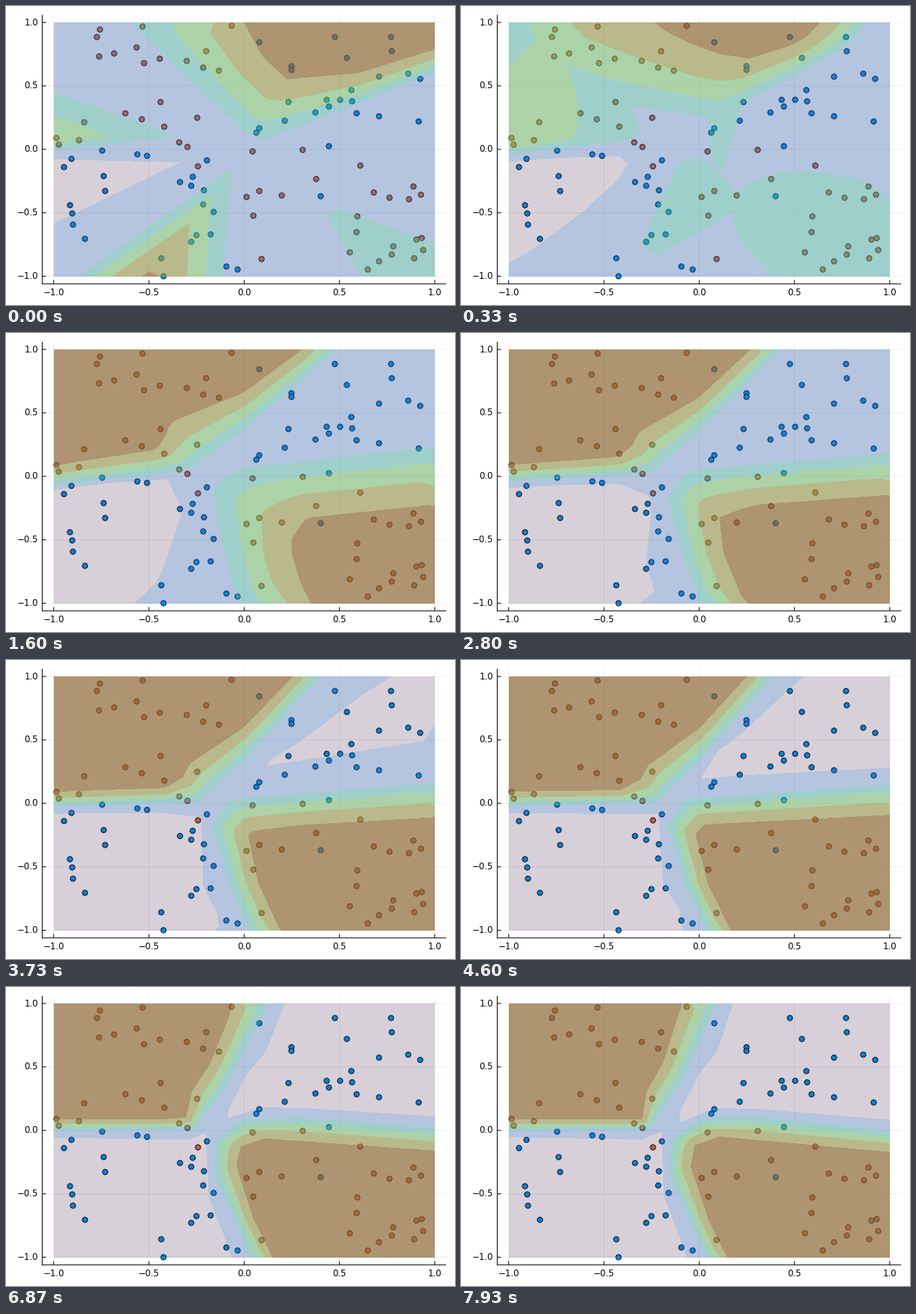
These frames come from a looping animation (600x400 px, 8 s). A matplotlib script:

```python
import numpy as np
import matplotlib.pyplot as plt
from matplotlib.animation import FuncAnimation
from matplotlib.path import Path

W, H, DPI = 600, 400, 100
FRAMES, LOOP = 120, 8000
PX = 72 / DPI
LEFT, RIGHT, TOP, BOTTOM = 64, 573, 22, 362
KEYS = [0, 13, 69, 118]

# Far corners that close the regions outside the plot
UL, UR = (-400, -400), (1000, -400)
LL, LR = (-400, 800), (1000, 800)

gx, gy = np.meshgrid(np.arange(LEFT, RIGHT) + 0.5, np.arange(TOP, BOTTOM) + 0.5)
gx, gy = gx.astype("float32"), gy.astype("float32")

# Per key pose: signed distance to the region above each of the five levels
fields = np.full((len(KEYS), 5) + gx.shape, -np.inf, "float32")
fields[:, 0] = np.inf


def distance(*pts):
    """Signed distance to a polygon, positive inside."""
    p = np.array(pts, "float32")
    best = np.full(gx.shape, np.inf, "float32")
    for (ax_, ay), (dx, dy) in zip(p, np.roll(p, -1, axis=0) - p):
        ux, uy = gx - ax_, gy - ay
        t = np.clip((ux * dx + uy * dy) / (dx * dx + dy * dy), 0, 1)
        best = np.minimum(best, (ux - t * dx) ** 2 + (uy - t * dy) ** 2)
    inside = Path(p).contains_points(np.column_stack([gx.ravel(), gy.ravel()]))
    return np.where(inside.reshape(gx.shape), 1, -1) * np.sqrt(best)


def raise_to(key, level, dist):
    f = fields[key]
    f[level - 1] = np.maximum(f[level - 1], dist)


def low(key, *pts):
    fields[key, 0] = np.minimum(fields[key, 0], -distance(*pts))


def slope(key, corner, foot, top):
    """Levels 2 to 5 rise from a foot line to a top line."""
    a, b = distance(*foot, corner), distance(*top, corner)
    for level, t in zip((2, 3, 4, 5), (0, 0.27, 0.58, 1)):
        raise_to(key, level, (1 - t) * a + t * b)


# Untrained
slope(0, UR, [(163, 20), (318, 168), (342, 180), (446, 140), (577, 87)],
      [(317, 20), (342, 67), (375, 98), (470, 90), (577, 57)])
for level, left, tip, right in ((2, 95, (302, 217), 290), (3, 116, (274, 253), 267),
                                (4, 139, (245, 290), 242), (5, 180, (191, 355), 209)):
    raise_to(0, level, distance((left, 363), tip, (right, 363)))
raise_to(0, 2, distance((60, 114), (229, 174), (60, 194)))
raise_to(0, 3, distance((60, 147), (141, 174), (60, 186)))
raise_to(0, 2, distance((577, 320), (447, 271), (428, 277), (474, 363), LR))
low(0, (60, 205), (233, 209), (60, 293))

# Two opposite quadrants found
slope(1, UL, [(60, 207), (232, 184), (318, 126), (459, 20)],
      [(60, 179), (194, 149), (203, 118), (216, 104), (318, 75), (408, 20)])
slope(1, LR, [(577, 146), (318, 177), (276, 205), (283, 260), (303, 363)],
      [(577, 239), (412, 260), (404, 295), (420, 363)])
low(1, (60, 213), (140, 198), (220, 191), (222, 235), (190, 295), (130, 363), LL)

# All four quadrants found
slope(2, UL, [(60, 195), (260, 191), (318, 135), (420, 20)],
      [(60, 176), (213, 174), (240, 160), (250, 141), (318, 92), (384, 20)])
slope(2, LR, [(577, 166), (300, 187), (276, 222), (300, 300), (328, 363)],
      [(577, 207), (325, 220), (313, 232), (330, 300), (361, 363)])
low(2, (60, 205), (264, 206), (270, 300), (292, 334), (297, 363), LL)
low(2, (577, 144), (365, 155), (320, 159), (343, 122), (373, 100), (460, 20), UR)

# Settled
slope(3, UL, [(60, 192), (252, 190), (295, 125), (343, 20)],
      [(60, 177), (242, 177), (248, 140), (270, 102), (296, 20)])
slope(3, LR, [(577, 193), (395, 174), (318, 176), (280, 205), (278, 250), (328, 363)],
      [(577, 221), (345, 200), (312, 212), (307, 240), (330, 310), (356, 363)])
low(3, (60, 201), (243, 204), (268, 193), (271, 280), (296, 345), (302, 363), LL)
low(3, (577, 178), (395, 163), (338, 162), (293, 181), (292, 168), (318, 117),
    (343, 85), (364, 20), UR)

# The observed samples of both classes
BLUE = [(338, 48), (439, 41), (514, 41), (515, 60), (455, 69), (381, 80), (381, 85), (537, 90),
        (553, 97), (498, 94), (461, 112), (428, 125), (446, 125), (462, 127), (431, 134),
        (377, 128), (413, 142), (468, 143), (498, 147), (551, 154), (372, 153), (338, 163),
        (334, 169), (431, 187), (420, 254), (128, 193), (87, 204), (77, 215), (175, 198),
        (188, 200), (268, 206), (130, 227), (132, 247), (232, 235), (249, 228), (247, 240),
        (264, 246), (263, 265), (277, 275), (85, 266), (88, 277), (89, 292), (105, 311),
        (254, 306), (273, 305), (247, 315), (207, 337), (210, 361), (294, 348), (309, 352)]
RED = [(125, 31), (121, 41), (182, 27), (174, 55), (144, 63), (124, 67), (184, 76), (205, 70),
       (241, 73), (267, 60), (263, 82), (284, 86), (301, 26), (206, 128), (159, 143),
       (181, 151), (211, 161), (255, 149), (104, 155), (97, 179), (67, 176), (70, 185),
       (231, 182), (242, 188), (256, 214), (329, 194), (396, 192), (473, 213), (414, 231),
       (321, 255), (338, 247), (368, 253), (330, 280), (341, 338), (491, 249), (512, 256),
       (544, 241), (538, 258), (554, 252), (469, 281), (468, 302), (459, 329), (517, 321),
       (515, 332), (548, 312), (555, 310), (557, 326), (545, 337), (498, 341), (483, 352)]

# Band colour as seen on white, and how much shows through
BANDS = [((215, 208, 216), 0.80), ((181, 196, 224), 0.65), ((160, 208, 204), 0.50),
         ((172, 211, 168), 0.42), ((185, 185, 140), 0.36), ((174, 148, 113), 0.30)]


def veil(seen, through):
    c = (np.array(seen) / 255 - through) / (1 - through)
    return (*np.clip(c, 0, 1), 1 - through)


COLORS = np.round(255 * np.array([veil(*b) for b in BANDS])).astype("uint8")

fig = plt.figure(figsize=(W / DPI, H / DPI), dpi=DPI, facecolor="white")
ax = fig.add_axes([0, 0, 1, 1])
ax.set_xlim(0, W)
ax.set_ylim(H, 0)
ax.axis("off")


def to_px(x, y):
    return 318.3 + 254.6 * x, 191.8 - 169.8 * y


def line(x, y, alpha=1.0, z=5):
    ax.plot(x, y, color="black", lw=PX, alpha=alpha, zorder=z,
            solid_capstyle="butt", snap=False)


font = dict(family="DejaVu Sans", size=8.5, color="black")
x0, y0 = to_px(-1.06, -1.06)
x1, y1 = to_px(1.06, 1.06)
for v in np.linspace(-1, 1, 5):
    x, y = to_px(v, v)
    label = f"{v:.1f}".replace("-", "\u2212")
    line([x, x], [y0, y1], 0.07, 0)
    line([x0, x1], [y, y], 0.07, 0)
    line([x, x], [y0, y0 - 5])
    line([x0, x0 + 5], [y, y])
    ax.text(x, 383.5, label, ha="center", va="center", **font)
    ax.text(43, y, label, ha="right", va="center", **font)
line([x0, x0], [y0 + 0.5, y1])
line([x0 - 0.5, x1], [y0, y0])

for pts, color in ((RED, "#E26F46"), (BLUE, "#009AFA")):
    ax.plot(*(np.array(pts).T + 0.3), "o", ms=7.2 * PX, mfc=color, mec="black",
            mew=0.9 * PX, zorder=1, snap=False)


def bands(i):
    k = min(np.searchsorted(KEYS, i, side="right") - 1, len(KEYS) - 2)
    u = min((i - KEYS[k]) / (KEYS[k + 1] - KEYS[k]), 1)
    t = 1 - (1 - u) ** 1.7
    above = (1 - t) * fields[k] + t * fields[k + 1] > 0
    return COLORS[np.logical_and.accumulate(above, axis=0).sum(axis=0)]


fill = ax.imshow(bands(0), extent=(LEFT, RIGHT, BOTTOM, TOP), aspect="auto",
                 interpolation="nearest", zorder=2)


def draw(i):
    fill.set_data(bands(i))
    return [fill]


anim = FuncAnimation(fig, draw, frames=FRAMES, interval=LOOP / FRAMES,
                     init_func=lambda: draw(0), repeat=True, repeat_delay=0)
plt.show()
```
